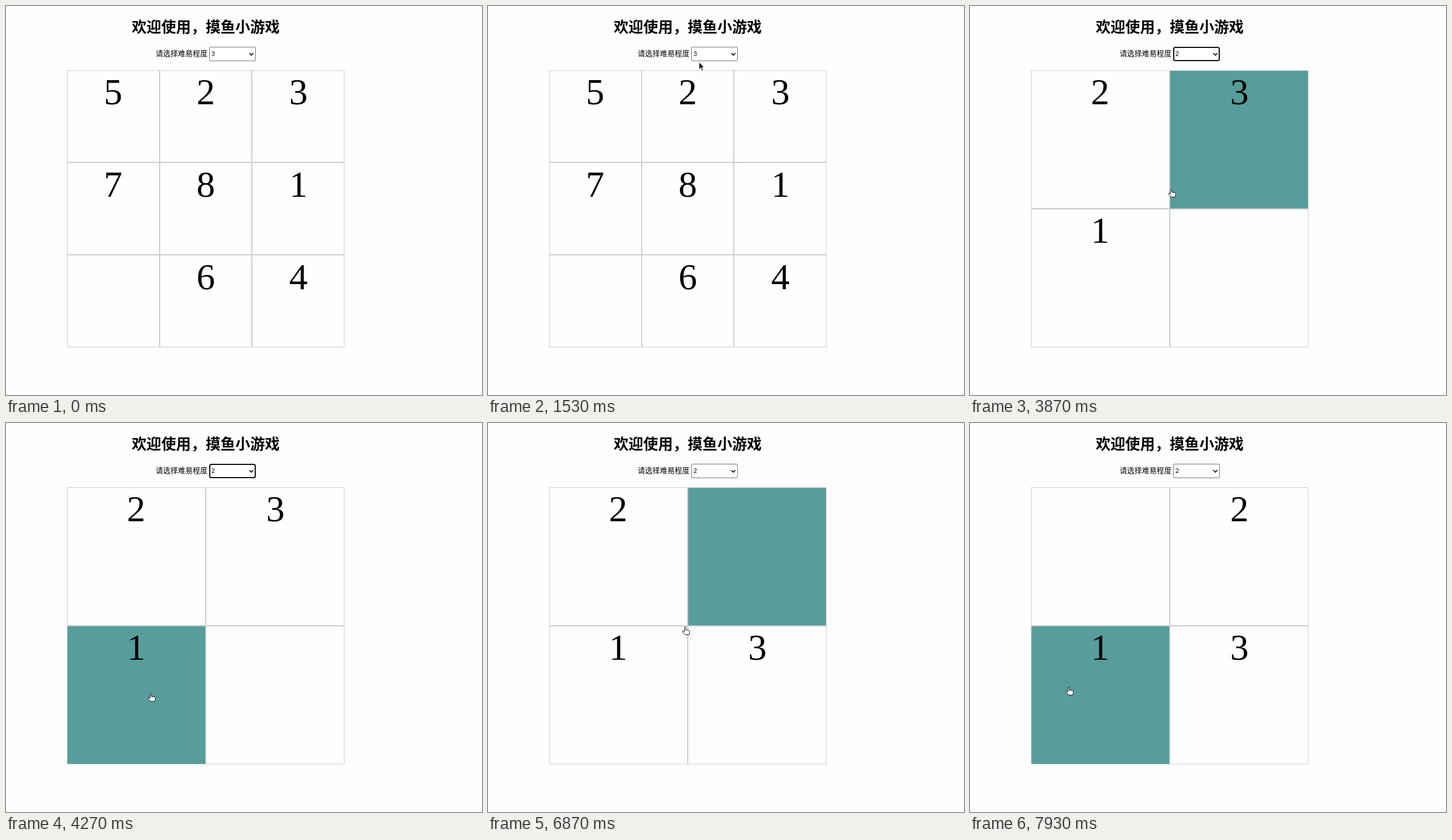
An HTML page that plays this animation: 827 by 677 pixels, repeating every 8 s.

```html
<!DOCTYPE html>
<html lang="zh-CN">
<head>
<meta charset="utf-8">
<title>摸鱼小游戏</title>
<style>
  html, body { margin: 0; width: 100%; height: 100%; overflow: hidden; background: #fefefe; }
  svg { display: block; width: 100vw; height: 100vh; }
  .zh { font-family: "Noto Sans CJK SC", "Noto Sans CJK", sans-serif; }
  .num { font: 64.3px "Liberation Serif", serif; }
  .ui { font: 10.72px "Liberation Sans", sans-serif; }
  .edge { fill: none; stroke: #c6c6c6; stroke-opacity: .88; }
  #list { filter: drop-shadow(0 2px 3.5px rgba(0, 0, 0, .38)); }
</style>
</head>
<body>
<svg viewBox="0 0 827 677">
  <text class="zh" x="347" y="46" font-size="25.73" font-weight="700" text-anchor="middle">欢迎使用，摸鱼小游戏</text>
  <text class="zh" x="260" y="87" font-size="12.86">请选择难易程度</text>
  <g id="board"></g>
  <rect id="frame" fill="#fff"/>
  <text id="value" class="ui" x="357" y="87"></text>
  <path d="M422.8 82l3.5 3.5 3.5-3.5" fill="none" stroke="#000" stroke-width="1.6"/>
  <g id="list"></g>
  <g id="cursor">
    <path id="arrow" d="M.5.5V13.4l3-2.7 2.2 4.9 2.3-1-2.1-4.7h4z" fill="#222" stroke="#fff" stroke-width=".9"/>
    <path id="hand" transform="translate(-5)" d="M4.3 9V1.9a1.2 1.2 0 0 1 2.4 0V6l5 .8q1.7.3 1.7 1.9v2.1l-1 3.7H5.8L3.3 12 .9 9.2Q.3 8.1 1.3 7.7q.9-.2 1.7.6z" fill="#fff" stroke="#111" stroke-linejoin="round"/>
  </g>
</svg>
<script>
const LOOP = 8000, TICK = 200 / 3;
const X0 = 105.8, Y0 = 111.6, SIZE = 482.4, DIGIT = 32.15;
const $ = id => document.getElementById(id);

// Ticks at which the mouse is pressed
const ENTER = 11, OPEN = 30, PICK = 44, CLICKS = [96, 112];

// Pointer moves: start, end, goal x and y, power of the ease
const moves = [
  [ENTER, 22, 366, 97, 1.05],
  [24, 27, 396, 76, 1],
  [33, 40, 406, 101, 1],
  [PICK, 49, 387, 260, 1],
  [55, 61, 251, 470, 1.85],
  [87, 92, 390, 290, 1.5],
  [CLICKS[0], 103, 342, 354, 2],
  [103, 108, 235, 290, 1],
  [CLICKS[1], 119, 171, 459, 1]
];

function tipAt(k) {
  if (k < ENTER) return null;
  let x = 350, y = 627;
  for (const [a, b, gx, gy, power] of moves) {
    if (k <= a) break;
    const u = Math.min(1, (k - a) / (b - a)) ** power;
    x += (gx - x) * u;
    y += (gy - y) * u;
  }
  return [Math.round(x), Math.round(y)];
}

// Index of the cell under a point, or -1
function cellAt(tip, n) {
  if (!tip) return -1;
  const c = Math.floor((tip[0] - X0) / SIZE * n), r = Math.floor((tip[1] - Y0) / SIZE * n);
  return Math.min(c, r) >= 0 && Math.max(c, r) < n ? r * n + c : -1;
}

// A click swaps the cell with the gap, written as 0
function boardAt(k) {
  const cells = [...(k < PICK ? "523781064" : "2310")];
  for (const click of CLICKS.filter(c => c <= k)) {
    const i = cellAt(tipAt(click), 2), gap = cells.indexOf("0");
    [cells[i], cells[gap]] = [cells[gap], cells[i]];
  }
  return cells;
}

const rect = (x, y, w, h, attrs) =>
  `<rect x="${x}" y="${y}" width="${w}" height="${h}" ${attrs}/>`;
const text = (x, y, kind, value, fill = "#000") =>
  `<text class="${kind}" x="${x}" y="${y}" fill="${fill}">${value}</text>`;

function boardMarkup(cells, tip) {
  const n = Math.sqrt(cells.length), step = SIZE / n, hover = cellAt(tip, n);
  const edge = (origin, i) => Math.round(origin + i * step);
  return cells.map((d, i) => {
    const c = i % n, r = Math.floor(i / n);
    const x = edge(X0, c), y = edge(Y0, r);
    const w = edge(X0, c + 1) - x, h = edge(Y0, r + 1) - y;
    const fill = i === hover ? rect(x, y, w, h, 'fill="#569d9c"') : "";
    const label = d === "0" ? ""
      : text(edge(X0 - DIGIT / 2, c + .5), edge(Y0 + 59.4, r), "num", d);
    return fill + rect(x + .5, y + .5, w - 1, h - 1, 'class="edge"') + label;
  }).join("");
}

function listMarkup(tip) {
  const row = 13.3, top = 96;
  const active = tip[1] < top ? 1 : Math.floor((tip[1] - top) / row);
  const rows = [2, 3, 4, 5, 6].map((v, i) => {
    const on = i === active, y = top + i * row;
    const bar = on ? rect(354, y, 79, row + .4, 'fill="#f0542d"') : "";
    return bar + text(357, Math.round(y + 10.6), "ui", v, on ? "#fff" : "#111");
  });
  return rect(353.5, 95.5, 80, 68, 'fill="#eee" stroke="#777"') + rows.join("");
}

function drawSelect(k, tip) {
  const focus = k >= PICK && k < CLICKS[0];
  const hover = k < OPEN && tip && tip[0] > 353 && tip[1] < 96;
  const line = focus ? 2 : 1;
  const attrs = {
    x: 353 + line / 2, y: 71 + line / 2, width: 81 - line, height: 25 - line,
    rx: line + .5, "stroke-width": line,
    stroke: focus ? "#101010" : hover ? "#4f4f4f" : "#767676"
  };
  for (const name in attrs) $("frame").setAttribute(name, attrs[name]);
  $("value").textContent = k < PICK ? 3 : 2;
}

function draw(k) {
  const tip = tipAt(k), open = k >= OPEN && k < PICK;
  // The hover colour trails the pointer by one tick
  $("board").innerHTML = boardMarkup(boardAt(k), open ? null : tipAt(k - 1));
  $("list").innerHTML = open ? listMarkup(tip) : "";
  drawSelect(k, tip);
  $("cursor").style.display = tip ? "" : "none";
  if (!tip) return;
  const hand = !open && cellAt(tip, 1) === 0;
  $("cursor").setAttribute("transform", `translate(${tip})`);
  $("hand").style.display = hand ? "" : "none";
  $("arrow").style.display = hand ? "none" : "";
}

const start = performance.now();
let last = -1;
function frame() {
  const t = (performance.now() - start) % LOOP;
  const k = Math.min(119, Math.floor((t + 4) / TICK));
  if (k !== last) draw(last = k);
  requestAnimationFrame(frame);
}
frame();
</script>
</body>
</html>
```
